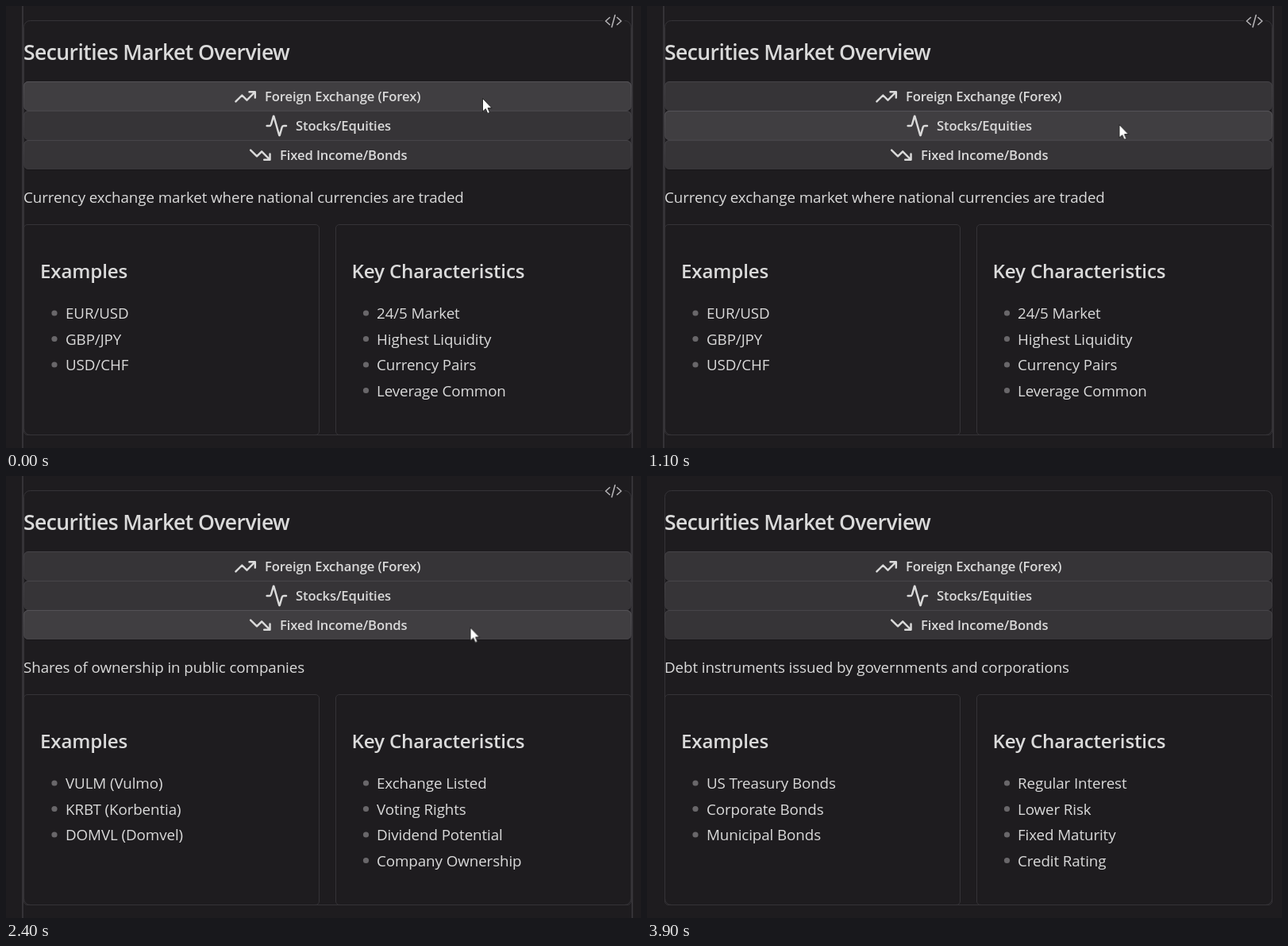
Recreate the animation shown at these times as an HTML page. Size 800 px wide and 557 px high, loop 4400 ms.

```html
<!DOCTYPE html>
<html lang="en">
<head>
<meta charset="utf-8">
<title>Securities Market Overview</title>
<style>
html, body { margin: 0; width: 100%; height: 100%; overflow: hidden; background: #1e1c1f; }
svg { display: block; }
text { font-family: "Open Sans", "Noto Sans", sans-serif; fill: #dadada; white-space: pre; }
.title { font-size: 26.6px; font-weight: 600; letter-spacing: -.6px; }
.head { font-size: 24.2px; font-weight: 600; letter-spacing: -.18px; }
.label { font-size: 16.6px; font-weight: 600; letter-spacing: -.1px; }
.body { font-size: 18.8px; letter-spacing: -.1px; }
.line { fill: none; stroke: #353337; }
.icon { fill: none; stroke: #dadada; stroke-width: 2; stroke-linecap: round; stroke-linejoin: round; }
.dots { fill: #69676a; }
.btn { fill: #363437; stroke: url(#edge); }
.lit { fill: #403e41; stroke: url(#litEdge); }
.shade { fill: #141315; opacity: .75; }

.lit, .page, .hover, #cursor { animation: 4.4s step-end infinite; }
.lit, .page { visibility: hidden; }
#lit1 { animation-name: first; }
#lit2 { animation-name: second; }
#lit3 { animation-name: third; }
#page1 { animation-name: forex; }
#page2 { animation-name: stocks; }
#page3 { animation-name: bonds; }
.hover { animation-name: hover; }
#cursor { animation-name: move; }

@keyframes first { 0% { visibility: visible } 25%, 100% { visibility: hidden } }
@keyframes second { 25% { visibility: visible } 54.545%, 100% { visibility: hidden } }
@keyframes third { 54.545% { visibility: visible } 88.636%, 100% { visibility: hidden } }
@keyframes forex { 0% { visibility: visible } 34.09%, 100% { visibility: hidden } }
@keyframes stocks { 34.09% { visibility: visible } 68.181%, 100% { visibility: hidden } }
@keyframes bonds { 68.181%, 100% { visibility: visible } }
@keyframes hover { 0% { visibility: visible } 88.636%, 100% { visibility: hidden } }
@keyframes move {
  0% { transform: translate(600px, 116px) }
  6.818% { transform: translate(600px, 119px) }
  9.09% { transform: translate(598px, 127px) }
  11.363% { transform: translate(596px, 138px) }
  13.636% { transform: translate(595px, 146px) }
  15.909%, 43.181% { transform: translate(594.5px, 149px) }
  43.182% { transform: translate(594px, 153px) }
  45.454% { transform: translate(592px, 163px) }
  47.727% { transform: translate(588px, 177px) }
  50% { transform: translate(585px, 187px) }
  52.272%, 72.726% { transform: translate(584.5px, 190.5px) }
  72.727% { transform: translate(592px, 172px) }
  75% { transform: translate(607px, 130px) }
  77.272%, 100% { transform: translate(617px, 103px) }
}
</style>
</head>
<body>
<svg width="800" height="557" viewBox="0 0 800 557">
  <defs>
    <linearGradient id="edge" x2="0" y2="1"><stop stop-color="#464448"/><stop offset="1" stop-color="#38363a"/></linearGradient>
    <linearGradient id="litEdge" x2="0" y2="1"><stop stop-color="#545256"/><stop offset="1" stop-color="#444246"/></linearGradient>
    <rect id="bar" x="22.5" width="765" height="36" rx="5.5"/>
    <g id="dot3"><circle cx="61" cy="387" r="3.6"/><circle cx="61" cy="419.5" r="3.6"/><circle cx="61" cy="452" r="3.6"/></g>
  </defs>

  <rect class="line" x="22.5" y="18.5" width="765" height="522" rx="8"/>
  <g class="hover">
    <path d="M21 0V557M789 0V557" stroke="#353337" stroke-width="2"/>
    <path d="M752 18.5H779" stroke="#1e1c1f" stroke-width="3"/>
    <path d="M760.5 14.5L755.5 19L760.5 23.5M770 14.5L775 19L770 23.5M767.3 11.5L763.2 26.5" fill="none" stroke="#b3b1b4" stroke-width="1.6" stroke-linecap="round" stroke-linejoin="round"/>
  </g>

  <text class="title" x="22" y="68">Securities Market Overview</text>

  <use href="#bar" class="shade" y="97"/>
  <use href="#bar" class="shade" y="134"/>
  <use href="#bar" class="shade" y="171"/>
  <use href="#bar" class="btn" y="95.5"/>
  <use href="#bar" class="btn" y="132.5"/>
  <use href="#bar" class="btn" y="169.5"/>
  <use href="#bar" class="lit" id="lit1" y="95.5"/>
  <use href="#bar" class="lit" id="lit2" y="132.5"/>
  <use href="#bar" class="lit" id="lit3" y="169.5"/>

  <g class="icon">
    <path transform="translate(287 99.7) scale(1.22)" d="M22 7L13.5 15.5L8.5 10.5L2 17M16 7H22V13"/>
    <path transform="translate(326.2 136.4) scale(1.22)" d="M22 12h-2.48a2 2 0 0 0-1.93 1.46l-2.35 8.36a.25.25 0 0 1-.48 0L9.24 2.18a.25.25 0 0 0-.48 0l-2.35 8.36A2 2 0 0 1 4.49 12H2"/>
    <path transform="translate(305.7 173) scale(1.22)" d="M22 17L13.5 8.5L8.5 13.5L2 7M16 17H22V11"/>
  </g>
  <text class="label" x="326" y="120">Foreign Exchange (Forex)</text>
  <text class="label" x="365" y="157">Stocks/Equities</text>
  <text class="label" x="345" y="194">Fixed Income/Bonds</text>

  <rect class="line" x="22.5" y="275.5" width="372" height="265" rx="4.5"/>
  <rect class="line" x="415.5" y="275.5" width="372" height="265" rx="4.5"/>
  <text class="head" x="43" y="343">Examples</text>
  <text class="head" x="435.5" y="343">Key Characteristics</text>
  <g class="dots">
    <use href="#dot3"/><use href="#dot3" x="392.5"/><circle cx="453.5" cy="484.5" r="3.6"/>
  </g>

  <g class="page body" id="page1">
    <text x="22" y="248">Currency exchange market where national currencies are traded</text>
    <text y="394"><tspan x="75">EUR/USD</tspan><tspan x="75" dy="32.6">GBP/JPY</tspan><tspan x="75" dy="32.6">USD/CHF</tspan></text>
    <text y="394"><tspan x="467">24/5 Market</tspan><tspan x="467" dy="32.6">Highest Liquidity</tspan><tspan x="467" dy="32.6">Currency Pairs</tspan><tspan x="467" dy="32.6">Leverage Common</tspan></text>
  </g>
  <g class="page body" id="page2">
    <text x="22" y="248">Shares of ownership in public companies</text>
    <text y="394"><tspan x="75">VULM (Vulmo)</tspan><tspan x="75" dy="32.6">KRBT (Korbentia)</tspan><tspan x="75" dy="32.6">DOMVL (Domvel)</tspan></text>
    <text y="394"><tspan x="467">Exchange Listed</tspan><tspan x="467" dy="32.6">Voting Rights</tspan><tspan x="467" dy="32.6">Dividend Potential</tspan><tspan x="467" dy="32.6">Company Ownership</tspan></text>
  </g>
  <g class="page body" id="page3">
    <text x="22" y="248">Debt instruments issued by governments and corporations</text>
    <text y="394"><tspan x="75">US Treasury Bonds</tspan><tspan x="75" dy="32.6">Corporate Bonds</tspan><tspan x="75" dy="32.6">Municipal Bonds</tspan></text>
    <text y="394"><tspan x="467">Regular Interest</tspan><tspan x="467" dy="32.6">Lower Risk</tspan><tspan x="467" dy="32.6">Fixed Maturity</tspan><tspan x="467" dy="32.6">Credit Rating</tspan></text>
  </g>

  <g class="hover">
    <path id="cursor" d="M.5 .5V17L4.3 13.6L6.8 19.4L9.4 18.2L7 12.6H12Z" fill="#fff" stroke="#111" stroke-width=".8"/>
  </g>
</svg>
</body>
</html>
```
